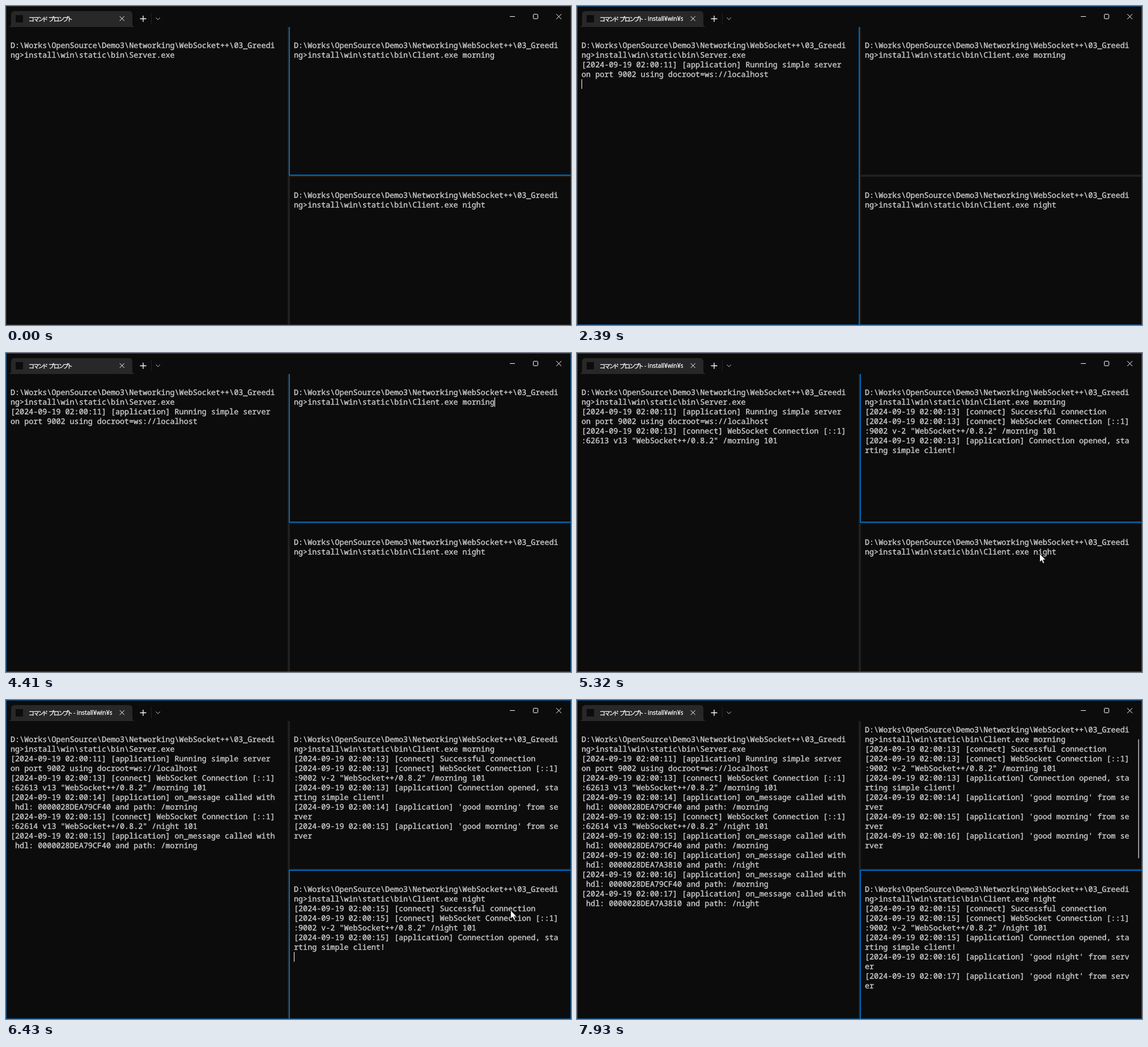
Animation of 997x562 px, one loop 8 s. Source, as an HTML page:

```html
<!DOCTYPE html>
<html lang="ja">
<head>
<meta charset="utf-8">
<title>Terminal</title>
<style>
html, body { margin: 0; width: 100%; height: 100%; overflow: hidden; background: #0c0c0c; }
#window {
  --accent: #0069b9; --edge: #333;
  position: relative; width: 997px; height: 562px; overflow: hidden; background: #0c0c0c;
}
#window.active { --edge: #0f5a99; }
#window::after { content: ""; position: absolute; inset: 0; border: 1px solid var(--edge); }
#bar { position: absolute; left: 0; top: 0; }
.title {
  position: absolute; top: 14px; line-height: 17px; color: #fff; white-space: pre; overflow: hidden;
  font-family: "Open Sans", "Noto Sans", sans-serif; font-size: 10.4px;
  -webkit-text-stroke: .3px currentColor;
}
#name {
  left: 40px; font-family: "Noto Sans CJK JP", "Noto Sans CJK", sans-serif;
  font-size: 10.5px; font-feature-settings: "palt"; letter-spacing: -1.2px; word-spacing: 2px;
}
#command { left: 119px; width: 68px; }
.pane { position: absolute; box-sizing: border-box; overflow: hidden; border: 0 solid #202020; }
.pane.focus { border-color: var(--accent); }
#server { left: 1px; top: 37px; width: 498px; height: 524px; border-right-width: 2px; }
#morning, #night { left: 499px; width: 497px; height: 262px; border-left-width: 2px; }
#morning { top: 37px; border-bottom-width: 2px; }
#night { top: 299px; border-top-width: 2px; }
pre {
  position: absolute; left: 7px; top: 7px; margin: 0; color: #ccc;
  font: 13.42px/17px "Noto Sans Mono", "DejaVu Sans Mono", monospace;
  font-variant-ligatures: none; text-rendering: geometricPrecision;
  -webkit-text-stroke: .4px currentColor;
}
.caret { position: absolute; width: 1px; height: 17px; background: #fff; }
#scrollbar {
  position: absolute; left: 489px; top: 32px; width: 2px; height: 210px;
  border-radius: 1px; background: #949494;
}
#mouse { position: absolute; left: 0; top: 0; z-index: 1; }
</style>
</head>
<body>
<div id="window">
  <svg id="bar" width="997" height="37" fill="none" stroke="#fff">
    <path d="M3 37Q9 37 9 31V15Q9 9 15 9H217Q223 9 223 15V31Q223 37 229 37Z" fill="#282828" stroke="none"/>
    <rect x="17" y="16" width="13" height="13" fill="#0c0c0c" stroke="none"/>
    <path d="M200.7 18.2l8 8m0-8l-8 8"/>
    <path d="M236.5 22.5h11m-5.5-5.5v11" stroke-width="1.3"/>
    <path d="M256.5 12v20" stroke="#222"/>
    <path d="M264.5 20.5l3.7 3.7 3.7-3.7" stroke="#ccc"/>
    <path d="M889 18.5h9M971 14.2l9 9m0-9l-9 9"/>
    <rect x="930.5" y="14.5" width="8" height="8" rx="1.2"/>
  </svg>
  <div class="title" id="name">コマンド プロンプト</div>
  <div class="title" id="command">- install¥win¥static</div>
  <div class="pane" id="server"><pre></pre><div class="caret"></div></div>
  <div class="pane" id="morning"><pre></pre><div class="caret"></div><div id="scrollbar"></div></div>
  <div class="pane" id="night"><pre></pre><div class="caret"></div></div>
  <svg id="mouse" width="13" height="20">
    <path d="M.5.5V15.5L4 12.3 6.4 17.8 8.8 16.8 6.5 11.4H11Z" fill="#fff" stroke="#000" stroke-width=".8"/>
  </svg>
</div>
<script>
const LOOP = 8000, COLUMNS = 58, CELL = 8.05, ROW = 17, INSET = 7;
const $ = id => document.getElementById(id);

const prompt = command =>
  [0, `D:\\Works\\OpenSource\\Demo3\\Networking\\WebSocket++\\03_Greeding>install\\win\\static\\bin\\${command}`];
const log = (time, second, channel, text) =>
  [time, `[2024-09-19 02:00:${second}] [${channel}] ${text}`];
const app = (time, second, text) => log(time, second, 'application', text);
const connect = (time, second, text) => log(time, second, 'connect', text);
const link = (time, second, detail, path) =>
  connect(time, second, `WebSocket Connection [::1]:${detail} "WebSocket++/0.8.2" /${path} 101`);
const received = (time, second, path) => app(time, second,
  `on_message called with hdl: 0000028DEA7${path === 'night' ? 'A3810' : '9CF40'} and path: /${path}`);
const greeting = (time, second, path) => app(time, second, `'good ${path}' from server`);
const opened = (time, second, path) => [
  connect(time, second, 'Successful connection'),
  link(time, second, '9002 v-2', path),
  app(time, second, 'Connection opened, starting simple client!')
];

const panes = {
  server: {
    carets: [[1490, 2110], [2390, 3110]],
    entries: [
      prompt('Server.exe'),
      app(2390, 11, 'Running simple server on port 9002 using docroot=ws://localhost'),
      link(4500, 13, '62613 v13', 'morning'),
      received(5410, 14, 'morning'),
      link(5900, 15, '62614 v13', 'night'),
      received(6430, 15, 'morning'),
      received(6930, 16, 'night'),
      received(7430, 16, 'morning'),
      received(7930, 17, 'night')
    ]
  },
  morning: {
    carets: [[3410, 4010], [4410, 5000]],
    scrollAt: 7530,
    entries: [
      prompt('Client.exe morning'),
      ...opened(4500, 13, 'morning'),
      greeting(5410, 14, 'morning'),
      greeting(6430, 15, 'morning'),
      greeting(7430, 16, 'morning')
    ]
  },
  night: {
    carets: [[5530, 6530], [7120, 7620]],
    entries: [
      prompt('Client.exe night'),
      ...opened(5900, 15, 'night'),
      greeting(6930, 16, 'night'),
      greeting(7930, 17, 'night')
    ]
  }
};

const focus = [[0, 'morning'], [1490, 'server'], [3410, 'morning'], [5530, 'night']];
const running = [[2390, 3410], [4500, 5530], [5900, LOOP]];
const pointer = [
  [0], [720, 360, 22], [810, 361, 31], [1030, 358, 43], [1090, 356, 52],
  [1310, 350, 61], [1400, 346, 68], [1490, 344, 72], [1710, 354, 75], [2390],
  [3110, 480, 95], [3210, 640, 88], [3310, 760, 82], [3410, 791, 80], [3600, 801, 82], [4410],
  [5140, 806, 180], [5230, 811, 285], [5320, 816, 353], [5410, 858, 364], [5530, 890, 370], [6530]
];

const latest = (steps, t) => steps.findLast(step => step[0] <= t);
const within = (spans, t) => spans.some(([from, to]) => t >= from && t < to);
const show = (element, visible) => { element.style.visibility = visible ? 'visible' : 'hidden'; };

function drawPane(id, t) {
  const { entries, carets, scrollAt = LOOP } = panes[id];
  const element = $(id), pre = element.querySelector('pre'), caret = element.querySelector('.caret');
  const visible = entries.filter(([time]) => time <= t);
  const lines = ['', ...visible.flatMap(([, text]) => text.match(new RegExp(`.{1,${COLUMNS}}`, 'g')))];
  if (visible.length > 1) lines.push('');
  const text = lines.join('\n');
  if (pre.textContent !== text) pre.textContent = text;
  pre.style.top = INSET - (t >= scrollAt ? ROW : 0) + 'px';
  caret.style.left = Math.round(INSET + lines.at(-1).length * CELL) + 'px';
  caret.style.top = INSET + (lines.length - 1) * ROW + 'px';
  show(caret, within(carets, t));
  element.classList.toggle('focus', latest(focus, t)[1] === id);
}

function draw(now) {
  const t = now % LOOP;
  Object.keys(panes).forEach(id => drawPane(id, t));
  $('window').classList.toggle('active', t >= 1030);
  show($('command'), within(running, t));
  $('scrollbar').style.opacity = t < 7530 ? 0 : t < 7620 ? 0.5 : 1;
  const [, x, y] = latest(pointer, t);
  show($('mouse'), x !== undefined);
  if (x !== undefined) $('mouse').style.transform = `translate(${x}px, ${y}px)`;
}

const start = performance.now();
function tick() {
  draw(performance.now() - start);
  requestAnimationFrame(tick);
}
tick();
</script>
</body>
</html>
```
